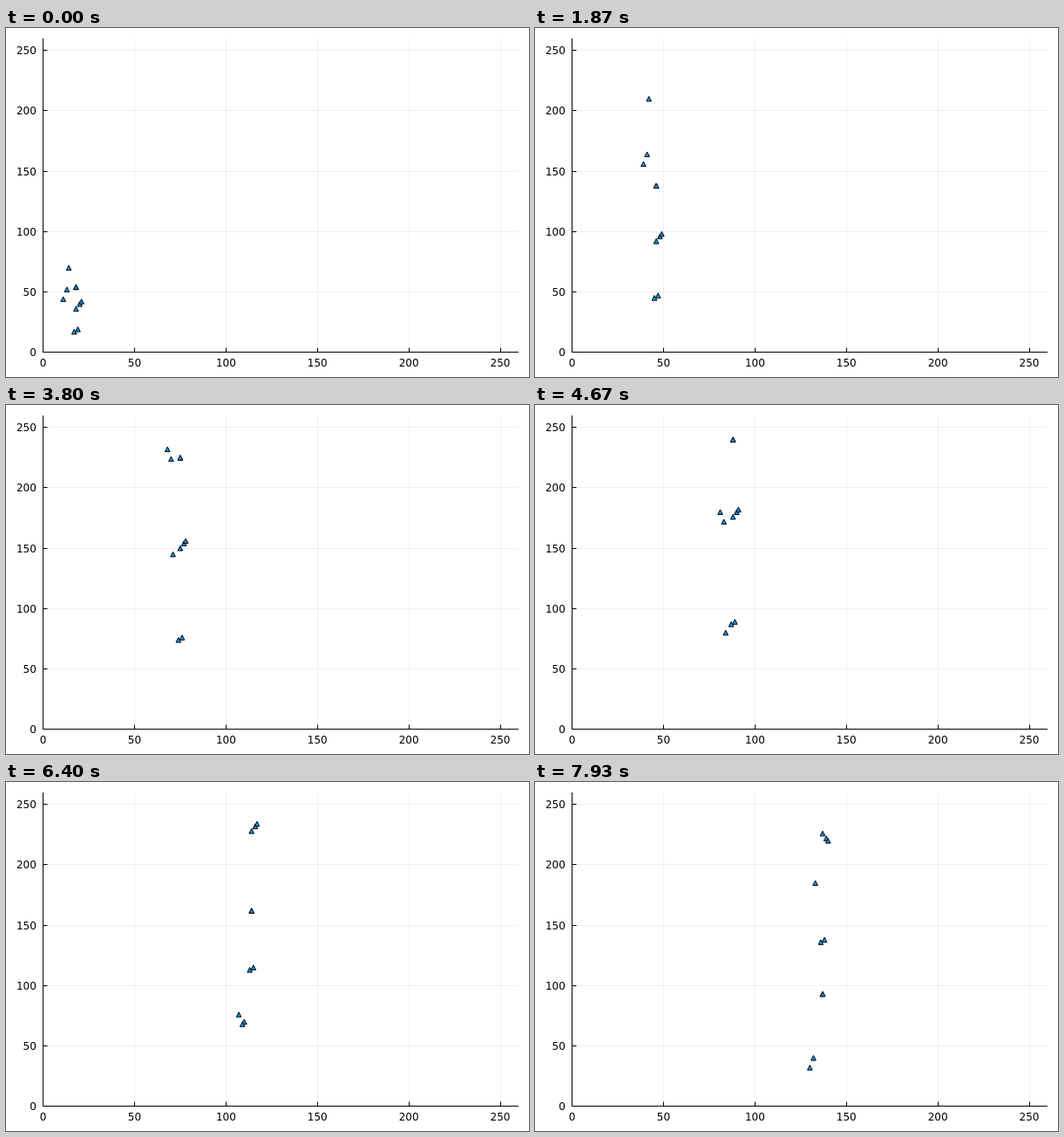
Animation of 600x400 px, one loop 8000 ms. Source, as an HTML page with a canvas:

```html
<!DOCTYPE html>
<html lang="en">
<head>
<meta charset="utf-8">
<title>Bouncing markers</title>
<style>
  html, body { margin: 0; width: 100%; height: 100%; overflow: hidden; background: #fff; }
  canvas { display: block; }
</style>
</head>
<body>
<canvas id="stage" width="600" height="400"></canvas>
<script>
const ctx = document.getElementById('stage').getContext('2d');
const LOOP = 8000;
const LEFT = 42.6, RIGHT = 588, TOP = 12, BOTTOM = 371.6, RANGE = 260;
const LOW = 10, HIGH = 250;
const TICKS = [0, 50, 100, 150, 200, 250];

// Each marker starts at (x, x * speed) and moves one unit right per step.
const markers = [
  [14, 5], [13, 4], [11, 4], [18, 3], [18, 3],
  [18, 2], [20, 2], [21, 2], [17, 1], [19, 1]
];

const px = x => LEFT + x * (RIGHT - LEFT) / RANGE;
const py = y => BOTTOM - y * (BOTTOM - TOP) / RANGE;
const snap = v => Math.floor(v) + 0.5;

function line(x1, y1, x2, y2, color) {
  ctx.strokeStyle = color;
  ctx.beginPath();
  ctx.moveTo(x1, y1);
  ctx.lineTo(x2, y2);
  ctx.stroke();
}

function drawAxes() {
  const x0 = snap(LEFT), y0 = snap(BOTTOM);
  ctx.lineWidth = 1;
  for (const t of TICKS.slice(1)) {
    line(snap(px(t)), TOP, snap(px(t)), y0, 'rgba(0,0,0,0.06)');
    line(x0, snap(py(t)), RIGHT, snap(py(t)), 'rgba(0,0,0,0.06)');
  }
  line(x0 - 0.5, y0, RIGHT, y0, '#000');
  line(x0, TOP, x0, y0 + 0.5, '#000');

  ctx.font = '12px "DejaVu Sans", sans-serif';
  ctx.fillStyle = '#000';
  for (const t of TICKS) {
    line(snap(px(t)), y0, snap(px(t)), y0 - 5, '#000');
    line(x0, snap(py(t)), x0 + 5, snap(py(t)), '#000');
    ctx.textAlign = 'center';
    ctx.fillText(t, px(t), 387.5);
    ctx.textAlign = 'right';
    ctx.fillText(t, 34.8, py(t) + 4.4);
  }
}

function heightAt(y, speed, steps) {
  for (let i = 0; i < steps; i++) {
    y += speed;
    if (y >= HIGH || y <= LOW) speed = -speed;
  }
  return y;
}

function drawMarker(x, y) {
  const r = 2.8;
  ctx.beginPath();
  ctx.moveTo(x, y - r);
  ctx.lineTo(x + r, y + r);
  ctx.lineTo(x - r, y + r);
  ctx.closePath();
  ctx.fillStyle = '#009afa';
  ctx.fill();
  ctx.strokeStyle = '#000';
  ctx.lineWidth = 1;
  ctx.lineJoin = 'round';
  ctx.stroke();
}

function render(ms) {
  // 15 steps per second, with starts rounded to 10 ms
  const step = Math.floor((Math.floor(ms / 10) + 0.5) * 0.15);
  ctx.fillStyle = '#fff';
  ctx.fillRect(0, 0, 600, 400);
  drawAxes();
  for (const [x, speed] of markers) {
    drawMarker(px(x + step), py(heightAt(x * speed, speed, step)));
  }
}

const start = performance.now();
function tick() {
  render((performance.now() - start) % LOOP);
  requestAnimationFrame(tick);
}
tick();
</script>
</body>
</html>
```
